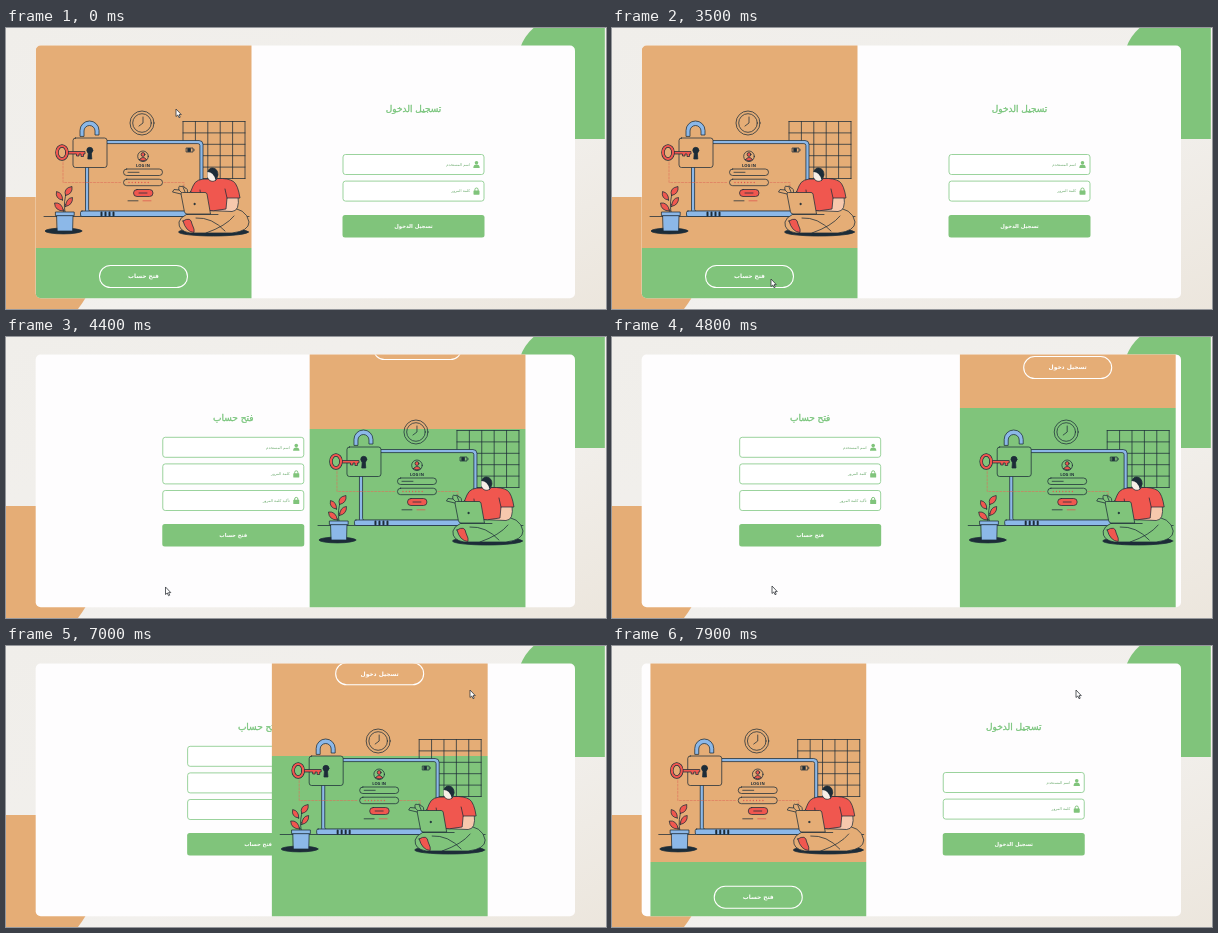
An HTML page that plays this animation: 600x281 px, repeating every 8000 ms.

```html
<!DOCTYPE html>
<html lang="ar">
<head>
<meta charset="utf-8">
<style>
html, body { margin: 0; width: 100%; height: 100%; overflow: hidden; background: #f0eeea; }
svg { display: block; width: 600px; height: 281px; }
text { font-family: "DejaVu Sans", sans-serif; text-anchor: middle; }
.title { font-size: 9px; fill: #78c47b; stroke: #78c47b; stroke-width: .3; }
.label { font-size: 5.3px; font-weight: bold; fill: #fff; }
.pill + .label { font-size: 5.9px; }
.hint { font-size: 3.8px; fill: #70ad72; direction: rtl; text-anchor: start; }
.box { fill: #fff; stroke: #8acb8c; stroke-width: .85; }
.green { fill: #80c47b; }
.pill { fill: none; stroke: #fff; stroke-width: 1.1; }
.art { stroke: #1d2c38; stroke-width: .75; stroke-linecap: round; stroke-linejoin: round; fill: none; }
.art .bg { fill: url(#split); }
.art .red { fill: #f0574f; }
.art .blue { fill: #8cb8e8; }
.art .dark { fill: #1d2c38; }
.art .skin { fill: #f6c8ad; }
.art .dash { stroke: #e0705c; stroke-width: .6; stroke-dasharray: 2 1.6; }
.art text { font: bold 4px "Open Sans", sans-serif; fill: #1d2c38; stroke: none; }
</style>
</head>
<body>
<svg viewBox="0 0 600 281">
  <defs>
    <linearGradient id="paper" x2="1" y2="1">
      <stop stop-color="#f0eeea"/><stop offset=".6" stop-color="#f2f0ed"/><stop offset="1" stop-color="#ece6dd"/>
    </linearGradient>
    <linearGradient id="split" gradientUnits="userSpaceOnUse" x1="0" y1="0" x2="0" y2="281">
      <stop stop-color="#e5ad76"/><stop class="cut" stop-color="#e5ad76"/>
      <stop class="cut" stop-color="#80c47b"/><stop offset="1" stop-color="#80c47b"/>
    </linearGradient>
    <clipPath id="card"><rect x="29.7" y="17.5" width="539.3" height="252.7" rx="5"/></clipPath>
  </defs>
  <rect width="600" height="281" fill="url(#paper)"/>
  <path class="green" d="M527.500 0Q518.500 8 514.500 19V60L560 111H598.800V0Z"/>
  <path fill="#e5ad76" d="M0 169H34L90 250Q82 268 72 281H0Z"/>

  <g clip-path="url(#card)">
    <rect width="600" height="281" fill="#fefdfe"/>
    <g id="login"></g>
    <g id="signup"></g>
    <g id="panel">
      <rect x="29.700" y="17" width="215.800" height="254" fill="url(#split)"/>
      <g class="art">
        <path d="M38 188.500H243"/>
        <path id="grid"/>
        <circle cx="136" cy="95" r="12"/><circle cx="136" cy="95" r="9.300"/><path d="M137 89V95L133 98"/>

        <!-- monitor -->
        <rect class="blue" x="79.500" y="112.500" width="117.500" height="74" rx="4"/>
        <rect class="bg" x="82.600" y="115.600" width="111.300" height="67.700" rx="2"/>
        <rect class="blue" x="74.500" y="183" width="112" height="5.500" rx="1.500"/>
        <path stroke-width="2" d="M95.500 184.500v3m4-3v3m4-3v3m4-3v3"/>
        <rect x="180.500" y="120" width="6.500" height="4"/><path class="dark" d="M182 120.500h2.500v3h-2.500zM188 121.300v1.400"/>
        <circle cx="137" cy="128.300" r="5.300"/>
        <circle class="red" cx="137" cy="126.500" r="1.900"/><path class="red" d="M133.300 131.800Q137 127 140.700 131.800Q137 134 133.300 131.800Z"/>
        <text x="137" y="138.500">LOG IN</text>
        <rect x="117.500" y="141" width="39" height="6.500" rx="3.200"/><path d="M122 144.300h11"/>
        <rect x="117.500" y="151.200" width="39" height="6.500" rx="3.200"/>
        <path stroke="#e0554c" stroke-width="1.300" stroke-dasharray="0 3.200" d="M123 154.500h20"/>
        <rect class="red" x="127.500" y="161.500" width="19.500" height="7" rx="3.500"/><path d="M133 165h8"/>
        <path d="M122 172.800h10"/><path stroke="#e0554c" d="M137 172.800h8"/>
        <path class="dash" d="M57 131V154.500H115M158 154.500H178V163"/>

        <!-- padlock and key -->
        <path class="blue" d="M74 108V102.500A9.500 9.500 0 0 1 93 102.500V107H89V103A5.500 5.500 0 0 0 78 103V108Z"/>
        <rect class="bg" x="67" y="110" width="34" height="29.500" rx="2.500"/>
        <path class="dark" d="M82.300 124.500L81.800 131h4L85.300 124.500Z"/><circle class="dark" cx="83.800" cy="122.300" r="3"/>
        <path class="red" d="M60 123.500H79V126H77.500V128.500H75V126H73V128H70.500V126H60Z"/>
        <ellipse cx="56" cy="124.500" rx="5" ry="6.500" stroke-width="3.500"/>
        <ellipse cx="56" cy="124.500" rx="5" ry="6.500" stroke="#f0574f" stroke-width="2.200"/>

        <!-- plant -->
        <ellipse class="dark" cx="57.500" cy="203" rx="18.500" ry="2.900"/>
        <path d="M59 184Q57 174 61 163M58.500 183L53 177M59 177L64 172"/>
        <path class="red" d="M59.500 167.500Q57 160 66 158.500Q67 166 59.500 167.500ZM56.500 172Q49 171 50.500 163.500Q57 165 56.500 172ZM59.500 178.500Q60 170 66.500 169.500Q67 177 59.500 178.500ZM57.500 183Q49 183 48.500 175Q56 174 57.500 183Z"/>
        <path class="blue" d="M51 187.500H67L66.600 203H51.400Z"/><rect class="blue" x="49.800" y="184" width="18.400" height="3.700"/>

        <!-- person with laptop -->
        <ellipse class="dark" cx="207.500" cy="204" rx="35" ry="4"/>
        <path class="bg" d="M200 181Q175 185 173 194Q172 203 184 205H226Q243 203 243 194Q241 180 220 179Z"/>
        <path d="M200 205Q220 198 228 188M190 190Q206 189 219 203"/>
        <path class="red" d="M177 193Q185 188 186 196Q189 202 188 204.500Q180 204 177 193Z"/>
        <path class="skin" d="M222 167L232 168Q234 183 226 183.500L202 182.500L203 177L214 178Z"/>
        <path class="red" d="M202 151Q190 150 187 158L184.500 164L193 170L194 182Q208 184 220 181L221 170L234 170Q232 157 227.500 153.500Q222 150 212 150.500Z"/>
        <path d="M194 162L195 170M221 170L219 161"/>
        <path class="skin" d="M185 164L194 170L191 173Q184 172 180 168Z"/>
        <path class="bg" d="M180 168L175 166L166.500 164L168 161.500L173 162Q172 157 175 158.500Q178 157 179 160Q182 160 181.500 165Z"/>
        <path d="M173 162L177 166M177 159L179 164"/>
        <path class="skin" d="M203 148V152Q207 155 211 151V147Z"/>
        <path class="dark" d="M202 143.500Q203 139.500 207 140Q212 141 212 147L209.500 152.500L204 148Z"/>
        <path fill="#f7eee7" stroke="none" d="M201.500 144Q207.500 144 209.500 152Q204 154 201.500 149Z"/>
        <path class="bg" d="M175 165.500Q175 164.500 176.500 164.500H199Q200.500 164.500 201 166L204.500 186H181Q179 186 178.500 184Z"/>
        <path d="M181 186.500H212"/><circle class="dark" cx="188.500" cy="176" r=".7"/>
      </g>
      <g id="toSignup"><rect class="pill" x="93.500" y="237.500" width="88" height="22" rx="11"/><text class="label" x="137.500" y="250.300">فتح حساب</text></g>
      <g id="toLogin"><rect class="pill" x="93.500" y="28.500" width="88" height="22" rx="11"/><text class="label" x="137.500" y="41.300">تسجيل دخول</text></g>
    </g>
  </g>
  <path id="cursor" fill="#fff" stroke="#33363c" stroke-width=".8" d="M0 0V7.500L1.800 6L3 8.700L4.200 8.200L3.100 5.600H5.300Z"/>
</svg>
<script>
const $ = id => document.getElementById(id);
const LOOP = 8000, SLIDE = 1500, OPEN = 3586, CLOSE = 6715;

// Forms are built around x = 0
const person = y => `<g class="green"><circle cx="63" cy="${y - 1.7}" r="1.8"/><path d="M59.800 ${y + 3.5}q0-3.400 3.200-3.400t3.200 3.400z"/></g>`;
const lock = y => `<rect class="green" x="60" y="${y - .7}" width="6" height="4.300" rx=".6"/>
  <path fill="none" stroke="#80c47b" d="M61.400 ${y}v-1.500a1.600 1.600 0 0 1 3.200 0v1.500"/>`;
const form = (title, action, top, hints) =>
  `<text class="title" y="84">${title}</text>` +
  hints.map((hint, i) => {
    const y = top + i * 26.6;
    return `<rect class="box" x="-70.500" y="${y - 10}" width="141" height="20" rx="2.500"/>
      <text class="hint" x="56.500" y="${y + 1.3}">${hint}</text>${i ? lock(y) : person(y)}`;
  }).join('') +
  `<rect class="green" x="-71" y="187" width="142" height="22.500" rx="2.500"/><text class="label" y="200">${action}</text>`;

$('login').innerHTML = form('تسجيل الدخول', 'تسجيل الدخول', 136.5, ['اسم المستخدم', 'كلمة المرور']);
$('signup').innerHTML = form('فتح حساب', 'فتح حساب', 110.3, ['اسم المستخدم', 'كلمة المرور', 'تأكيد كلمة المرور']);

let grid = '';
for (let i = 0; i < 6; i++) grid += `M${177 + i * 12.4} 93.500v57M177 ${93.5 + i * 11.4}h62`;
$('grid').setAttribute('d', grid);

// cubic-bezier(.25, .1, .25, 1)
function ease(x) {
  if (x <= 0) return 0;
  if (x >= 1) return 1;
  const curve = (a, b, s) => 3 * a * s * (1 - s) ** 2 + 3 * b * s * s * (1 - s) + s ** 3;
  let lo = 0, hi = 1;
  for (let i = 0; i < 24; i++) {
    const mid = (lo + hi) / 2;
    if (curve(.25, .25, mid) < x) lo = mid; else hi = mid;
  }
  return curve(.1, 1, lo);
}

const path = [[0, 170, 81], [300, 170, 81], [1000, 195, 105], [1700, 244, 131], [2200, 244, 131],
  [2900, 190, 215], [3300, 159, 251], [4000, 159, 251], [4800, 160, 249], [5000, 165, 245],
  [5400, 430, 80], [5600, 456, 59], [5900, 464, 44], [8000, 464, 44]];
function pointer(t) {
  const i = path.findIndex(p => p[0] > t);
  const [t0, x0, y0] = path[i - 1], [t1, x1, y1] = path[i];
  const k = (t - t0) / (t1 - t0), s = k * k * (3 - 2 * k);
  return [x0 + (x1 - x0) * s, y0 + (y1 - y0) * s];
}

const move = (id, x, y) => $(id).setAttribute('transform', `translate(${x} ${y})`);
const cuts = document.querySelectorAll('.cut');

function draw(now) {
  const t = now % LOOP;
  const back = ease((t - CLOSE) / SLIDE);
  const p = ease((t - OPEN) / SLIDE) - back;
  const late = ease((t - OPEN - 480) / SLIDE) - back;

  move('panel', 325.3 * p, 0);
  move('toSignup', 0, 100 * p);
  move('toLogin', 0, 43 * (late - 1));
  cuts.forEach(c => c.setAttribute('offset', (220 - 152 * p) / 281));
  for (const id of ['login', 'signup']) {
    move(id, 407.5 - 214 * p, 0);
    $(id).style.display = (id === 'signup') === (p > .5) ? '' : 'none';
  }
  move('cursor', ...pointer(t));
  requestAnimationFrame(() => draw(performance.now() - start));
}
const start = performance.now();
draw(0);
</script>
</body>
</html>
```
